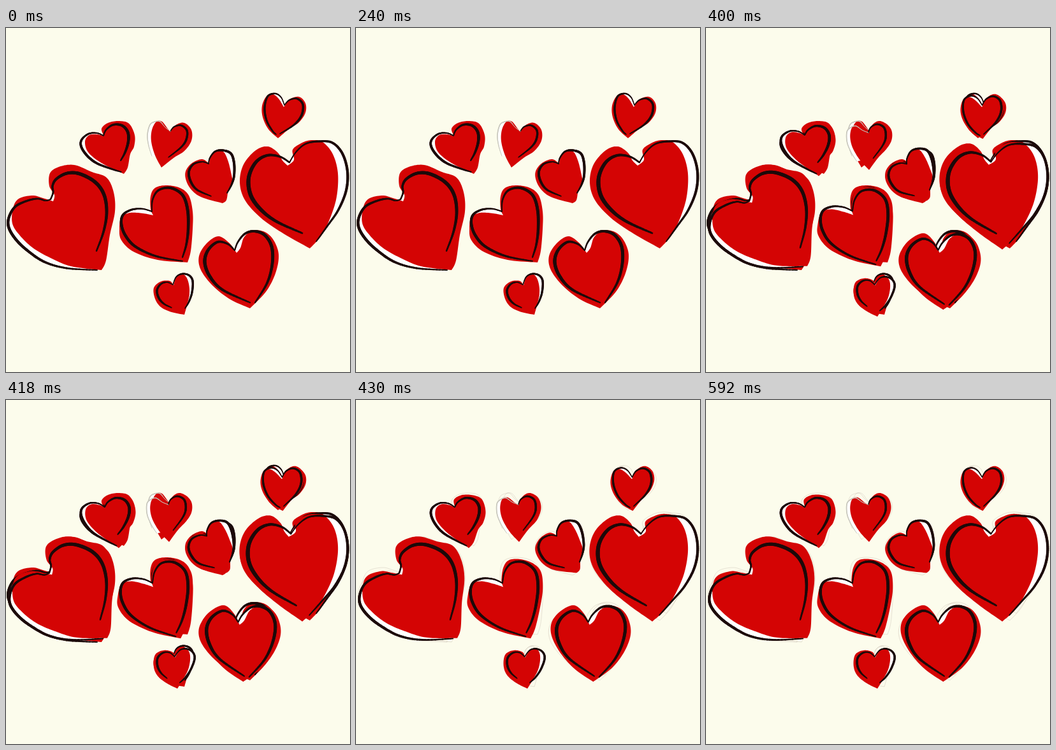
Recreate the animation shown at these times as an HTML page with a canvas. Size 540 by 540 pixels, loop 700 ms.

```html
<!DOCTYPE html>
<html lang="en">
<head>
<meta charset="utf-8">
<title>Wobbling hearts</title>
<style>
html, body { margin: 0; width: 100%; height: 100%; overflow: hidden; background: #fcfcec; }
canvas { display: block; }
</style>
</head>
<body>
<canvas id="stage" width="540" height="540"></canvas>
<script>
const ctx = document.getElementById('stage').getContext('2d');
const RED = '#d40404', INK = '#1c0a0a';
const hearts = [];

// Catmull-Rom curve through "x,y x,y ..." as a dense list of points
function curve(text) {
  const p = text.split(' ').map(s => s.split(',').map(Number));
  const out = [], n = p.length;
  for (let i = 0; i < n - 1; i++) {
    const a = p[Math.max(i - 1, 0)], b = p[i], c = p[i + 1], d = p[Math.min(i + 2, n - 1)];
    for (let k = 0; k < 10; k++) {
      const t = k / 10;
      out.push([0, 1].map(j => b[j] + t / 2 * (c[j] - a[j] +
        t * (2 * a[j] - 5 * b[j] + 4 * c[j] - d[j] + t * (3 * (b[j] - c[j]) + d[j] - a[j])))));
    }
  }
  out.push(p[n - 1]);
  return out;
}

function outline(right, left) {
  const path = new Path2D();
  [...right, ...left.slice().reverse()].forEach(q => path.lineTo(...q));
  path.closePath();
  return path;
}

// Every curve runs from the notch of the heart down to its tip.
// pose: [degrees, centre x, centre y, shift x, shift y] of the second pose
function heart(pose, redRight, redLeft, inkRight, inkLeft, wRight, wLeft, leftInk = INK) {
  const r = curve(inkRight), l = curve(inkLeft);
  hearts.push({
    pose,
    red: outline(curve(redRight), curve(redLeft)),
    paper: outline(r, l),
    strokes: [[r, wRight, INK], [l, wLeft, leftInk]]
  });
}

heart([-6, 85, 300, 1, 1],
  '74,272 76,262 68,248 69,228 83,218 107,215 135,226 158,235 169,258 171,288 163,325 157,365 150,380',
  '74,272 58,267 42,263 20,268 11,283 10,307 22,326 42,345 68,360 102,374 150,380',
  '70,269 74,258 73,248 79,237 96,228 116,229 140,242 154,262 158,290 153,320 142,350',
  '70,269 62,271 50,268 34,271 15,280 5,296 4,312 14,330 32,348 60,367 95,377 143,380',
  5.5, 4.5);

heart([9, 160, 187, -1, 0],
  '154,170 150,158 160,149 177,146 193,150 202,168 201,186 195,198 191,219 185,229',
  '154,170 144,167 131,168 124,178 129,195 150,212 185,229',
  '153,169 157,160 168,152 182,153 191,163 192,178 187,195 180,208',
  '153,169 143,165 130,166 119,175 118,186 127,200 142,212 165,221 181,226',
  4.5, 4);

heart([-15, 256, 182, 2, 2],
  '258,163 267,152 280,149 291,160 291,177 280,193 263,204 244,219',
  '258,163 253,157 245,147 236,147 229,160 228,178 234,200 244,219',
  '258,162 264,155 275,153 284,161 283,175 275,187 255,203',
  '258,162 250,156 242,147 234,147 226,152 222,168 224,185 229,201',
  3.4, 1.6, '#c9c8be');

heart([-9, 320, 232, 0, 0],
  '319,213 321,203 330,193 341,194 348,207 353,226 355,241 349,255 346,270 340,275',
  '319,213 308,206 292,212 282,225 283,240 292,255 308,266 340,275',
  '318,213 320,204 328,194 340,192 353,197 358,212 358,232 354,246 347,259',
  '318,213 308,210 294,214 287,226 290,241 300,254 322,264',
  4, 3.8);

heart([8, 235, 308, -2, 0],
  '231,294 227,284 227,264 234,251 252,247 273,251 287,263 293,288 293,315 290,350 285,368',
  '231,294 215,291 195,290 181,297 178,315 181,333 200,351 238,364 285,368',
  '229,288 230,270 239,255 258,251 277,262 285,285 286,315 283,340 277,360',
  '229,288 215,284 198,285 184,293 181,307 187,325 203,343 235,358 277,366',
  4.8, 4.5);

heart([6, 447, 262, -3, -1],
  '442,216 452,207 450,191 465,180 480,176 497,179 513,198 521,228 519,265 509,298 495,326 477,346',
  '442,216 434,208 427,196 411,186 392,192 373,214 367,242 375,270 400,298 436,323 477,346',
  '445,211 455,195 470,182 490,178 512,180 528,197 536,225 534,255 522,285 505,310 487,335',
  '445,211 430,202 410,200 392,211 381,235 384,262 400,285 425,304 465,322',
  4.2, 6.2);

heart([10, 365, 380, 0, 0],
  '362,353 368,345 374,328 388,318 406,320 420,333 428,356 423,385 408,414 383,440',
  '362,353 350,337 333,327 315,338 303,358 306,380 325,405 352,426 383,440',
  '359,349 364,336 375,323 390,319 406,325 417,343 418,370 410,400 391,431',
  '359,349 348,339 332,336 317,349 312,368 320,390 340,411 383,431',
  5, 5.2);

heart([-12, 436, 138, 0, 0],
  '436,124 445,112 460,108 470,118 470,133 460,148 445,158 427,173',
  '436,124 428,111 419,104 409,107 402,122 403,140 412,159 427,173',
  '437,121 445,113 457,111 466,120 464,137 452,152 430,166',
  '437,121 432,109 423,103 411,107 406,125 409,145 418,161 424,167',
  3.6, 3.2);

heart([16, 264, 416, -1, 0],
  '263,404 267,392 276,386 283,391 287,402 288,417 285,432 280,450',
  '263,404 257,397 243,398 232,408 234,425 243,438 260,446 280,450',
  '262,403 267,391 276,386 287,388 293,397 292,415 287,430 281,440',
  '262,403 253,399 243,402 237,412 240,424 248,433 260,439',
  3.4, 3.4);

// A brush line that swells past its middle and thins at the ends
function brush([points, width, colour]) {
  ctx.strokeStyle = colour;
  ctx.lineCap = 'round';
  for (let i = 1; i < points.length; i++) {
    const u = i / points.length;
    ctx.lineWidth = width * (0.4 + 0.6 * Math.sin(Math.PI * u ** 1.4));
    ctx.beginPath();
    ctx.moveTo(...points[i - 1]);
    ctx.lineTo(...points[i]);
    ctx.stroke();
  }
}

function paint(h) {
  ctx.fillStyle = '#fff';
  ctx.fill(h.paper);
  ctx.fillStyle = RED;
  ctx.fill(h.red);
  h.strokes.forEach(brush);
}

function trace(h) {
  ctx.strokeStyle = 'rgba(90, 50, 50, 0.22)';
  ctx.lineWidth = 0.6;
  ctx.stroke(h.red);
  ctx.stroke(h.paper);
}

function paintTurned(h) {
  const [deg, x, y, dx, dy] = h.pose;
  ctx.save();
  ctx.translate(x + dx, y + dy);
  ctx.rotate(deg * Math.PI / 180);
  ctx.translate(-x, -y);
  paint(h);
  ctx.restore();
}

function draw() {
  const t = performance.now() % 700;
  ctx.fillStyle = '#fcfcec';
  ctx.fillRect(0, 0, 540, 540);
  // First pose, a short overlap of both, then the second with a faint trace
  hearts.forEach(t < 430 ? paint : trace);
  if (t >= 400) hearts.forEach(paintTurned);
  requestAnimationFrame(draw);
}
draw();
</script>
</body>
</html>
```
